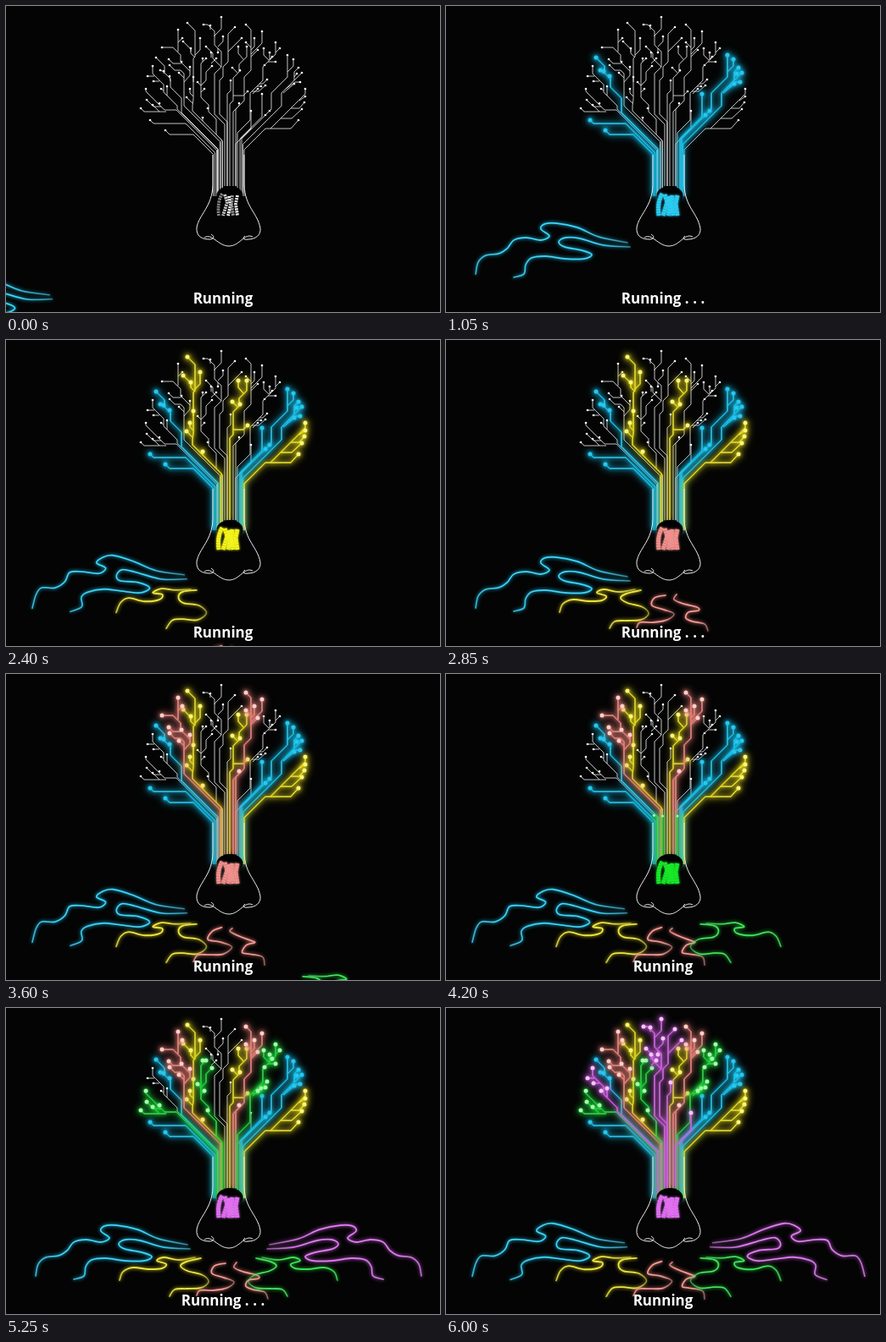
Write an HTML page that moves like this. It is 512 px wide and 362 px high and loops after 6.15 s.

```html
<!DOCTYPE html>
<html lang="en">
<head>
<meta charset="utf-8">
<title>Running</title>
<style>
  html, body { margin: 0; width: 100%; height: 100%; overflow: hidden; background: #040404; }
  svg { display: block; width: 100vw; height: 100vh; }
  path { fill: none; stroke-linejoin: round; }
  .wood path { stroke: #e4e4e4; stroke-width: .85; }
  .wood circle { fill: #fff; }
  .lit { filter: drop-shadow(0 0 2px var(--c)) drop-shadow(0 0 4px var(--c)); }
  .lit path { stroke: var(--c); stroke-width: 1.25; }
  .lit circle { fill: var(--dot); }
  .wave { filter: drop-shadow(0 0 2px var(--c)); }
  .wave path { stroke: url(#fade); stroke-width: 1.9; stroke-linecap: round; }
  .wave path.core { stroke: #fff; stroke-opacity: .5; stroke-width: .6; }
  .glint { fill: #fff; }
  .nose { stroke: #eee; stroke-width: 1; }
  text { font: 700 17px "Open Sans", sans-serif; fill: #fff; text-anchor: middle; white-space: pre; }
</style>
</head>
<body>
<svg viewBox="0 0 512 362" preserveAspectRatio="none">
  <defs id="defs"></defs>
  <g id="wood" class="wood"></g>
  <g id="glow"></g>
  <ellipse cx="264" cy="224" rx="15.5" ry="11" fill="#000"/>
  <path class="nose" d="M244 176V212C243 238 228 246 225 262C224 273 232 276 240 276C245 276 247 273 242 270M234 274C243 268 250 284 263 284C276 284 281 268 291 273M282 272C278 275 281 277 286 276C294 276 301 271 300 263C297 245 282 238 281 212V176"/>
  <g id="beads"></g>
  <g id="waves"></g>
  <text id="label" x="256" y="352"></text>
</svg>
<script>
const STEP = 150, COUNT = 41, STAGE = 8;
const TIPS = [168, 118, 62, 0];
const $ = id => document.getElementById(id);

function add(parent, tag, attrs) {
  const node = document.createElementNS("http://www.w3.org/2000/svg", tag);
  for (const key in attrs) node.setAttribute(key, attrs[key]);
  return parent.appendChild(node);
}

// Shapes of the air currents, from the outer end to the nose.
const outer = [
  "35 317 38 303 47 295 62 293 72 287 80 277 95 274 112 277 122 272 112 264 116 258 130 257 155 262 180 273 214 280",
  "80 321 92 317 94 306 101 298 118 296 140 299 163 299 172 294 160 289 140 285 133 279 141 274 158 275 186 283 217 285"
];
const inner = [
  "134 322 138 312 150 307 168 309 184 308 189 303 178 299 186 295 204 298 223 295",
  "193 341 199 333 214 332 230 331 239 324 232 316 214 311 206 305 213 300 230 296"
];
const middle = [
  "225 340 229 334 245 334 261 331 269 324 257 319 243 314 246 305 259 302",
  "309 344 305 336 291 333 283 329 286 322 298 320 296 316 280 312 269 307 272 301"
];

// Each branch runs from its leaf dot down to a joint or the trunk.
const stages = [
  { c: "#18bfe8", dot: "#25c8f0", bead: "#2ccbf0", waves: outer, from: [-159, 64],
    tree: "M188 147l5 5H221L244.5 175.5V225M170 135l4 4H212L246.5 173.5V225M177 61L187 71V79L194 86V96L207 109V126L250.5 169.5V225M182 76l5 2M186 77v3M193 83l1 6M302 104V131L276 157V225M332 58V84L313 103V122L278 157V225M345 73L340 78V88L325 103V118L279.5 163.5V225M343 80l-3 4M349 79L340 88M347 90H341L330 98M339 63V71L332 78M340 92L327 103M311 124l2 -2M306 129V128" },
  { c: "#e6dc1e", dot: "#fbf67c", bead: "#f4f41c", waves: inner, from: [-50, 62],
    tree: "M214 20l9 9V60l-2 2V110L220 118V124L254 158V225M229 38V52L223 58M209 42L218 51V56L223 61M218 50v4M221 84v6M213 108l7 7M217 98V103L221 107M232 132V136M284 48V60L275 69V78L268 85V112L264 116V213M274 48V56L280 63M267 73l6 6M285 101L280 106H268M276 76v2M345 135L336 145H306L281 170V225M353 98V104L312 145M353 107L346 112M352 114L346 121H336M349 122L337 133H324" },
  { c: "#e57f78", dot: "#ffd0ca", bead: "#f0908c", waves: middle, from: [0, 62],
    tree: "M184 49H197L206 58V66L217 77V82L210 90V118L252.5 160.5V225M203 28V54M208 38L203 43M192 63l5 5h9M207 66v2M193 70l6 6h7L210 80V90M204 79l6 6M217 72v5M283 22L289 28V76L281 84V112L268 125V213M302 30V44L289 57M293 38V48L289 52M283 43l6 6M297 52L289 60M275 115V118L271 122V213" },
  { c: "#1fd23c", dot: "#a8ffae", bead: "#18e828", waves: inner, flip: true, from: [-50, 62],
    tree: "M165 98V101L187 123H201L248.5 170.5V225M159 121l4 4H189M166 111l8 8h9M173 117l8 8M181 115v2M236 62L230 68V108L239 117V125L248 134V152L255.5 159.5V225M232 62v4M243 71L236 78V88L230 94M226 90l4 4M234 98L230 102M238 121h1M318 43V57L303 72V88L288 103V135L273 150V225M323 50L318 55M304 50V58L310 64M311 55V64M318 66H309M305 70v1M314 60L311 63M308 87L303 92H299M301 95h-5M306 94L298 101H290M297 98l-6 6" },
  { c: "#cd5fe0", dot: "#f6c4fb", bead: "#e070f0", waves: outer, flip: true, from: [-159, 64],
    tree: "M254 13V27L246 35V46L254 54V72L246 80V128L258 140V213M270 25L262 33V66L256 72V84L252 88V128L261 137V213M265 88V100L261 104V213M233 22h5L246 30V36M241 23v5M256 36V42L250 48M236 48l8 8V62L254 72M250 55V50M278 38L262 54M248 62L242 68M242 55v6M173 71V80L186 93V102L202 118V122L249.5 169.5V225M167 83h8M174 89h7M183 98l3 2M190 95V106M289 124V145L271 163V213" }
];

function drawTree(parent, d, r) {
  return d.match(/M[^M]+/g).map(part => {
    const branch = add(parent, "path", { d: part });
    const [x, y] = part.match(/[\d.]+/g);
    add(parent, "circle", { cx: x, cy: y, r });
    return branch;
  });
}

// Lowest point of a branch that has reached the given height.
function crossing(branch, y) {
  const length = branch.getTotalLength();
  if (branch.getPointAtLength(length).y < y) return null;
  for (let s = length; s > 0; s--) {
    const p = branch.getPointAtLength(s);
    if (p.y <= y) return p;
  }
  return null;
}

// Smooth curve through points; the second pose sways a little.
function curve(list, pose) {
  const n = list.split(" ").map(Number), pts = [];
  for (let i = 0; i < n.length; i += 2)
    pts.push([n[i] + pose * (1.5 * Math.sin(i) - 4), n[i + 1] + pose * (1.3 * Math.cos(i) - 1)]);
  const at = i => pts[Math.max(0, Math.min(pts.length - 1, i))];
  let d = "M" + pts[0];
  for (let i = 0; i < pts.length - 1; i++) {
    const [a, b, c, e] = [at(i - 1), at(i), at(i + 1), at(i + 2)];
    const c1 = b.map((v, k) => v + (c[k] - a[k]) / 6);
    const c2 = c.map((v, k) => v - (e[k] - b[k]) / 6);
    d += `C${c1} ${c2} ${c}`;
  }
  return d;
}

const fade = add($("defs"), "linearGradient", { id: "fade" });
[[0, .7], [.2, 1], [.7, 1], [1, .35]].forEach(([offset, o]) =>
  add(fade, "stop", { offset, style: `stop-color:var(--c);stop-opacity:${o}` }));

stages.forEach((s, k) => {
  drawTree($("wood"), s.tree, 1.35);

  const clip = add($("defs"), "clipPath", { id: "grow" + k });
  s.rect = add(clip, "rect", { x: 0, width: 512, height: 362 });
  s.lit = add($("glow"), "g", { class: "lit", style: `--c:${s.c};--dot:${s.dot}` });
  const branches = drawTree(add(s.lit, "g", { "clip-path": `url(#grow${k})` }), s.tree, 2.5);
  s.glints = TIPS.slice(0, 3).map(y => {
    const g = add(s.lit, "g", {});
    branches.map(b => crossing(b, y)).filter(Boolean).forEach(p =>
      add(g, "circle", { class: "glint", cx: p.x, cy: p.y, r: 1.5 }));
    return g;
  });

  const fadeId = "fade" + k;
  const own = add($("defs"), "linearGradient", { id: fadeId });
  [[0, .7], [.2, 1], [.7, 1], [1, .35]].forEach(([offset, o]) =>
    add(own, "stop", { offset, "stop-color": s.c, "stop-opacity": o }));
  const side = add($("waves"), "g", s.flip ? { transform: "matrix(-1 0 0 1 525 0)" } : {});
  s.wave = add(side, "g", { class: "wave", style: `--c:${s.c}` });
  s.poses = [0, 1].map(pose => {
    const g = add(s.wave, "g", {});
    s.waves.forEach(w => {
      const d = curve(w, pose);
      add(g, "path", { d, style: `stroke:url(#${fadeId})` });
      add(g, "path", { d, class: "core" });
    });
    return g;
  });
});

const strands = ["M255 222Q249 232 251 248", "M258 223L261 232L256 248", "M263 225L265 235L262 248",
  "M267 224L266 235L268 248", "M273 224L271 234L273 248"];
const beads = strands.map(d => add($("beads"), "path", { d }));

function show(node, on) { node.style.display = on ? "" : "none"; }

function paintBeads(color) {
  const plain = ["#858585", "#c9c9c9", "#fff", "#9a9a9a", "#f2f2f2"];
  beads.forEach((b, i) => {
    b.style.stroke = color || plain[i];
    b.style.strokeWidth = color ? 5 : 3.8;
    b.style.strokeDasharray = color ? "2.7 .4" : "2.2 .9";
  });
  $("beads").style.filter = color ? `drop-shadow(0 0 1.5px ${color})` : "none";
}

function render(frame) {
  let color = null;
  stages.forEach((s, k) => {
    const phase = frame - k * STAGE;
    show(s.wave, phase >= 0);
    const away = Math.max(0, 1 - phase / 2);
    s.wave.setAttribute("transform", `translate(${s.from[0] * away} ${s.from[1] * away})`);
    s.poses.forEach((g, i) => show(g, i === 1 - frame % 2));
    if (phase >= 3) color = s.bead;
    show(s.lit, phase >= 4);
    s.rect.setAttribute("y", TIPS[Math.max(0, Math.min(3, phase - 4))]);
    s.glints.forEach((g, i) => show(g, phase === i + 4));
  });
  paintBeads(color);
  $("label").textContent = "Running" + " .".repeat(frame % 4);
}

const start = performance.now();
let last = -1;
function tick() {
  const frame = Math.floor((performance.now() - start) / STEP) % COUNT;
  if (frame !== last) render(last = frame);
  requestAnimationFrame(tick);
}
tick();
</script>
</body>
</html>
```
